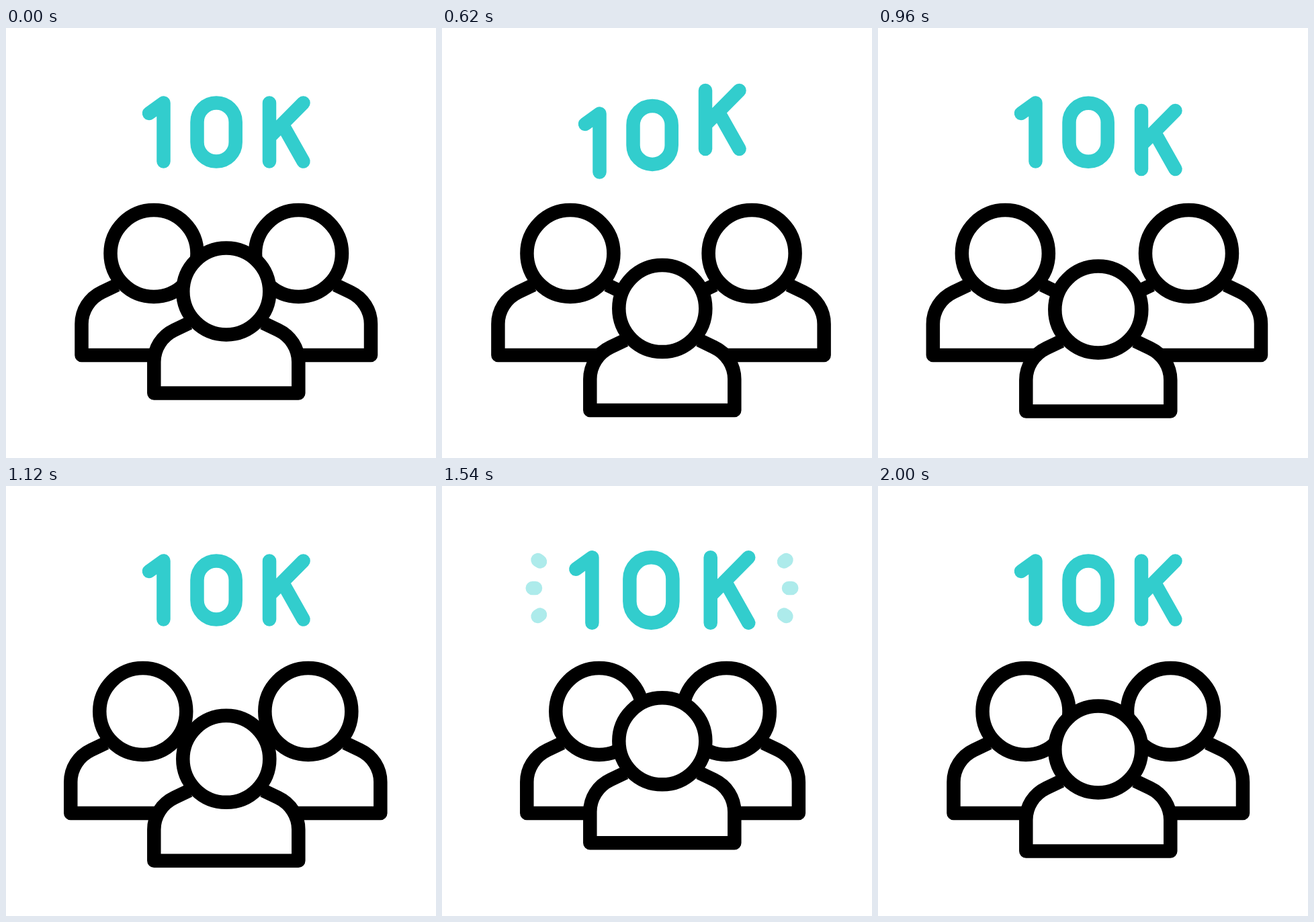
Write an HTML page with a canvas that moves like this. It is 640 px wide and 640 px high and loops after 2.1 s.

```html
<!DOCTYPE html>
<html lang="en">
<head>
<meta charset="utf-8">
<title>10K followers</title>
<style>
html, body { margin: 0; height: 100%; overflow: hidden; background: #fff; }
canvas { display: block; width: 640px; height: 640px; }
</style>
</head>
<body>
<canvas id="stage" width="640" height="640"></canvas>
<script>
const ctx = document.getElementById('stage').getContext('2d');
const LOOP = 2100, STEP = 20, TEAL = '#32cdcd';

const easeIn = s => 2 * s * s - s * s * s;
const easeOut = s => 1 - easeIn(1 - s);
const smooth = s => s * s * (3 - 2 * s);
const linear = s => s;

// Keys are [time, value, easing towards this key].
function track(keys, t) {
  if (t <= keys[0][0]) return keys[0][1];
  for (let i = 1; i < keys.length; i++) {
    const [t0, v0] = keys[i - 1], [t1, v1, ease] = keys[i];
    if (t < t1) return v0 + (v1 - v0) * ease((t - t0) / (t1 - t0));
  }
  return keys[keys.length - 1][1];
}

const spread = [[60, 0], [815, 1, easeIn], [1660, -0.38, easeOut], [2000, 0, smooth]];
const hop = [[40, 0], [300, -28, easeIn], [620, 16, easeOut], [850, 0, smooth]];
const zoom = [[1100, 1], [1560, 1.12, smooth], [2000, 1, smooth]];
const rayHead = [[1495, 0], [1720, 1, smooth]];
const rayTail = [[1640, 0], [1960, 1, smooth]];
const rayAlpha = [[1500, 0], [1600, 1, linear], [1860, 1, linear], [1980, 0, linear]];

function line(...points) {
  points.forEach(([x, y], i) => i ? ctx.lineTo(x, y) : ctx.moveTo(x, y));
}

const glyphs = [
  () => line([213, 127], [234.5, 111.5], [234.5, 198.5]),
  () => ctx.roundRect(284.5, 111.5, 57.2, 87, 28.5),
  () => {
    line([392, 111.5], [392, 198.5]);
    line([442.5, 111.5], [392, 162.5]);
    line([412, 144.5], [442.5, 198.5]);
  }
];

function person(x, y) {
  ctx.save();
  ctx.translate(x, y);
  ctx.lineCap = 'butt';
  ctx.beginPath();
  ctx.moveTo(-55, 47);
  ctx.lineTo(-77, 57.5);
  ctx.bezierCurveTo(-96, 66.5, -107.5, 85, -107.5, 105);
  ctx.lineTo(-107.5, 151.5);
  ctx.lineTo(107.5, 151.5);
  ctx.lineTo(107.5, 105);
  ctx.bezierCurveTo(107.5, 85, 96, 66.5, 77, 57.5);
  ctx.lineTo(55, 47);
  ctx.fill();
  ctx.stroke();
  ctx.beginPath();
  ctx.arc(0, 0, 64.5, 0, 7);
  ctx.fill();
  ctx.stroke();
  ctx.restore();
}

// Scales the outlines but keeps the stroke width.
function label(t) {
  const k = track(zoom, t);
  glyphs.forEach((glyph, i) => {
    ctx.save();
    ctx.translate(327.5, 155 + track(hop, t - 130 * i));
    ctx.scale(k, k);
    ctx.translate(-327.5, -155);
    ctx.beginPath();
    glyph();
    ctx.restore();
    ctx.stroke();
  });
}

function rays(t) {
  const alpha = track(rayAlpha, t);
  if (!alpha) return;
  const tail = track(rayTail, t), head = track(rayHead, t);
  ctx.globalAlpha = alpha;
  ctx.beginPath();
  for (const side of [-1, 1]) {
    for (const row of [-1, 0, 1]) {
      const [x, y, dx, dy] = row ? [181.5, 39.5, 33, 23.5] : [188.5, 0, 41, 0];
      line(...[tail, head].map(s => [327.5 + side * (x + dx * s), 152 + row * (y + dy * s)]));
    }
  }
  ctx.stroke();
  ctx.globalAlpha = 1;
}

function draw(now) {
  const t = Math.floor((now % LOOP) / STEP) * STEP;
  const d = track(spread, t);
  ctx.fillStyle = '#fff';
  ctx.fillRect(0, 0, 640, 640);
  ctx.lineJoin = ctx.lineCap = 'round';
  ctx.lineWidth = 20.5;

  ctx.strokeStyle = '#000';
  person(220 - 42 * d, 335.5);
  person(435.5 + 37 * d, 335.5);
  person(327.8, 392 + 37 * d);

  ctx.strokeStyle = TEAL;
  rays(t);
  label(t);
}

const start = performance.now();
function tick() {
  draw(performance.now() - start);
  requestAnimationFrame(tick);
}
tick();
</script>
</body>
</html>
```
